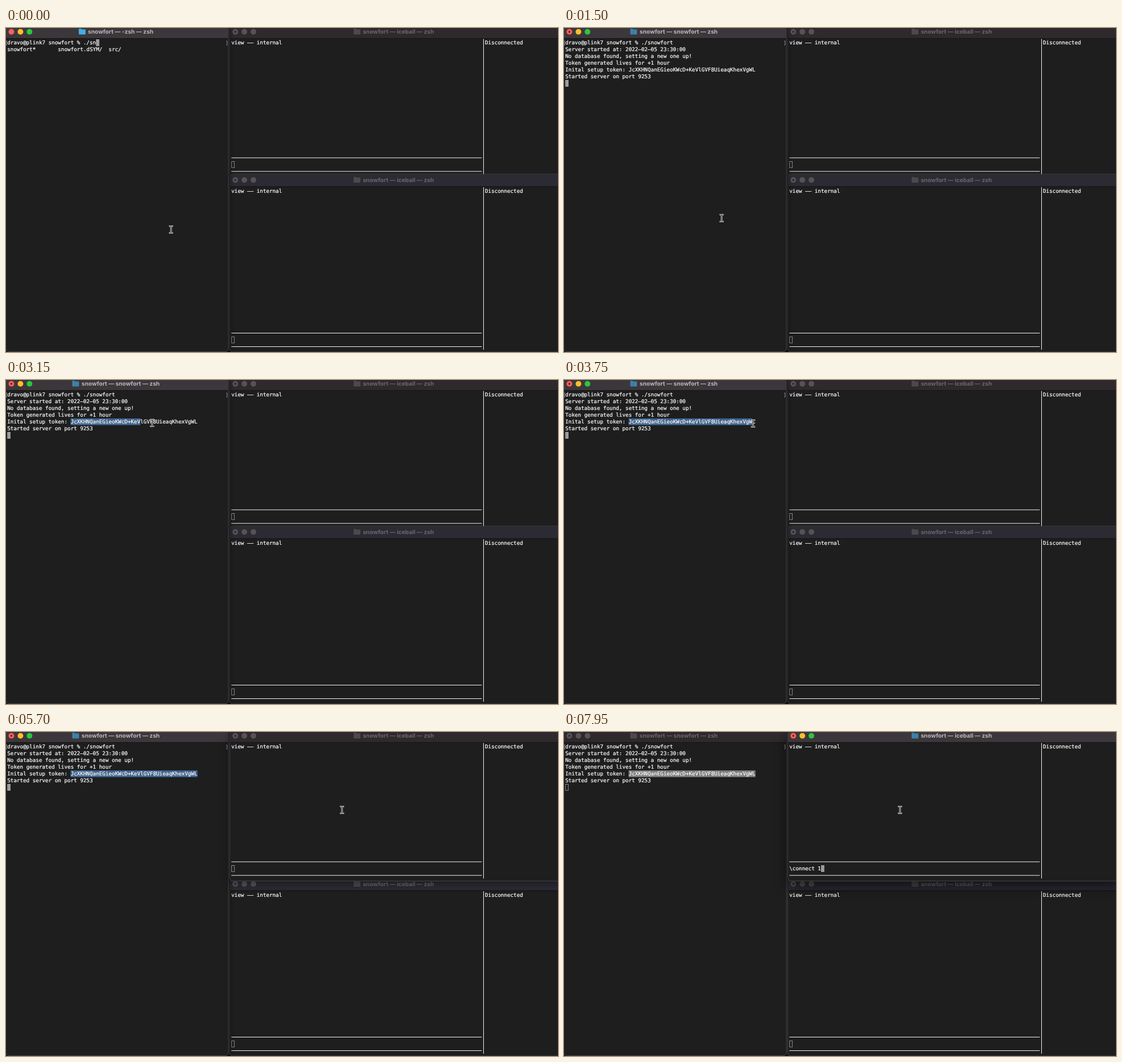
Recreate the animation shown at these times as an HTML page. Size 975 by 574 pixels, loop 8000 ms.

```html
<!DOCTYPE html>
<html lang="en">
<head>
<meta charset="utf-8">
<title>Terminal session</title>
<style>
  html, body { margin: 0; width: 100%; height: 100%; overflow: hidden; background: #121113; }
  svg { display: block; width: 975px; height: 574px; }
  text { white-space: pre; text-rendering: geometricPrecision; }
  .mono { font: 9.3px "DejaVu Sans Mono", monospace; fill: #fff; stroke: #fff; stroke-width: .22px; }
  .title { font: 700 10.2px Inter, sans-serif; text-anchor: middle; fill: #6c676b; }
  .frame { fill: #1e1e1e; stroke: #57555a; stroke-width: .8px; }
  .bar { fill: #2f292d; }
  #bottom .bar { fill: #2c2a33; }
  .edge { fill: #151315; }
  .folder { fill: #4d484b; }
  .light { fill: #575255; }
  .dot { fill: #2a2528; }
  .cell { fill: none; stroke: #8c8c8c; stroke-width: 1px; }
  .rule { fill: #f4f4f4; }
  .mark { fill: none; stroke: #8c8c8c; }
  .selection { fill: #7b7b7b; }
  .on .title { fill: #bcb8bb; }
  .on .bar { fill: #3c373a; }
  .on .folder { fill: #3c80a8; }
  .on.idle .folder { fill: #41aeea; }
  .on .light0 { fill: #ff5f57; }
  .on .light1 { fill: #febc2e; }
  .on .light2 { fill: #28c840; }
  .on .dot { fill: #7c1511; }
  .idle .dot { display: none; }
  .on .cell { fill: #9c9c9c; stroke: #9c9c9c; }
  .on .selection { fill: #3f638c; }
  #left.on .frame { filter: drop-shadow(2px 2px 4px rgba(0, 0, 0, .4)); }
  #top.raised .frame { filter: drop-shadow(0 4px 8px rgba(0, 0, 0, .4)); }
  #top.on .frame { filter: drop-shadow(0 9px 11px rgba(0, 0, 0, .6)); }
  #mouse path { fill: none; stroke: #f2f2f2; stroke-width: 2.6px; stroke-linecap: round; }
  #mouse .core { stroke: #161616; stroke-width: 1px; }
</style>
</head>
<body>
<svg id="stage" viewBox="0 0 975 574"></svg>
<script>
const LOOP = 8000, TICK = 150;
const COL = 5.6, ROW = 12, TOP = 19.5;
const PROMPT = 'dravo@plink7 snowfort % ./sn';
const COMMAND = PROMPT + 'owfort';
const LISTING = 'snowfort*'.padEnd(16) + 'snowfort.dSYM/'.padEnd(16) + 'src/';
const TOKEN = 'JcXKHNQanEGieoKWcD+KeVlGVF8UieaqKhexVgWL';
const LOG = [
  COMMAND,
  'Server started at: 2022–02–05 23:30:00',
  'No database found, setting a new one up!',
  'Token generated lives for +1 hour',
  'Inital setup token: ' + TOKEN,
  'Started server on port 9253',
];
const INPUT = '\\connect 1';
const LEFT_X = 2.2, RIGHT_X = 398, TOKEN_X = LEFT_X + 20 * COL;

const $ = id => document.getElementById(id);
const rowY = row => TOP + row * ROW;
const cellY = row => Math.round(rowY(row));
const mono = (x, row, text = '', id = '') =>
  `<text class="mono" ${id && `id="${id}"`} x="${x}" y="${rowY(row) + 9.7}">${text}</text>`;
const box = (cls, x, y, w, h) =>
  `<rect class="${cls}" x="${x}" y="${y}" width="${w}" height="${h}"/>`;
const cell = (id, x, row) =>
  `<rect class="cell" id="${id}" x="${x + .5}" y="${cellY(row) + .5}" width="${COL - .8}" height="${ROW - 1}"/>`;

// A window whose title bar starts just above y = 0
function chrome(id, x, w, h, titleX, title, folderX, content, y = 0) {
  const lights = [0, 1, 2].map(i =>
    `<circle class="light light${i}" cx="${x + 10 + 16 * i}" cy="6.7" r="5"/>`).join('');
  return `<g id="${id}" transform="translate(0 ${y})">
    <rect class="frame" x="${x}" y="-3.5" width="${w}" height="${h}" rx="6"/>
    <path class="bar" d="M${x + .4} 18V2.5q0-5.6 5.6-5.6H${x + w - 6}q5.6 0 5.6 5.6V18z"/>
    ${box('edge', x + .4, 18, w - .8, 1)}
    ${lights}<circle class="dot" cx="${x + 10}" cy="6.7" r="1.7"/>
    <path class="folder" transform="translate(${folderX} 1.2)"
      d="M0 1.2Q0 0 1.2 0H4l1.3 1.3h5.5q1.2 0 1.2 1.2V9q0 1.2-1.2 1.2H1.2Q0 10.2 0 9z"/>
    <text class="title" x="${titleX}" y="10">${title}</text>
    ${content}</g>`;
}

function client(id, rows, h, y) {
  const rule = row => box('rule', RIGHT_X, rowY(row) + 6, 79 * COL, 1);
  return chrome(id, 395, 590, h, 693, 'snowfort — iceball — zsh', 614,
    mono(RIGHT_X, 0, 'view –– internal') +
    mono(RIGHT_X + 80 * COL, 0, 'Disconnected') +
    box('rule', Math.floor(RIGHT_X + 79.5 * COL), TOP, 1, rows * ROW) +
    rule(rows - 3) + rule(rows - 1) +
    cell(id + 'Cell', RIGHT_X, rows - 2) +
    mono(RIGHT_X, rows - 2, '', id + 'Input'), y);
}

const server = chrome('left', -.5, 393.5, 577, 202.5, '', 0,
  `<path class="mark" d="M2 23H.5v7H2M389 23h1.5v7H389"/>` +
  `<rect class="selection" id="selection" x="${TOKEN_X}" y="${cellY(4)}" width="0" height="${ROW}"/>` +
  cell('leftCell', LEFT_X, 0) +
  LOG.map((_, i) => mono(LEFT_X, i, '', 'line' + i)).join(''));

const beam = 'M-2.5-6Q0-6 0-4.5Q0-6 2.5-6M0-4.5V4.5M-2.5 6Q0 6 0 4.5Q0 6 2.5 6';
$('stage').innerHTML =
  client('top', 20, 267.5, 0) + client('bottom', 24, 315, 262.5) + server +
  `<g id="mouse"><path d="${beam}"/><path class="core" d="${beam}"/></g>`;

const linear = p => p;
const smooth = p => p * p * (3 - 2 * p);
const slowDown = p => 1 - (1 - p) ** 2;

// [time, x, y, easing towards this point]
const PATH = [
  [1350, 291.5, 357],
  [2250, 114.5, 83, smooth],
  [2400, 115, 74.5, linear],
  [2550, 115, 72.5, linear],
  [2700, 115, 72.5, linear],
  [2850, 140, 73, linear],
  [3150, 258, 76, linear],
  [3750, 334, 77, slowDown],
  [4500, 339, 80, linear],
  [5100, 339, 80, linear],
  [5700, 593.5, 138, smooth],
];

function mouseAt(t) {
  const i = PATH.findIndex(key => key[0] > t);
  if (i === 0) return PATH[0].slice(1, 3);
  if (i < 0) return PATH[PATH.length - 1].slice(1, 3);
  const [t0, x0, y0] = PATH[i - 1], [t1, x1, y1, ease] = PATH[i];
  const p = ease((t - t0) / (t1 - t0));
  return [x0 + (x1 - x0) * p, y0 + (y1 - y0) * p];
}

// The highlight trails the pointer a little
function selectedChars(t) {
  if (t < 2850) return 0;
  const x = mouseAt(Math.min(t, 4550) - 50)[0];
  return Math.min(TOKEN.length, Math.floor((x - TOKEN_X) / COL));
}

function typedChars(t) {
  if (t < 6600) return 0;
  if (t < 7050) return 1;
  return 1 + Math.round(9 * ((t - 7050) / TICK + 1) / 7);
}

function logAt(t) {
  if (t < 150) return [PROMPT, LISTING];
  return t < 600 ? [COMMAND] : LOG;
}

function setCell(id, x, row) {
  $(id).setAttribute('x', x + .5);
  $(id).setAttribute('y', cellY(row) + .5);
}

function draw(t) {
  const running = t >= 750, raised = t >= 5700, swapped = t >= 5850;
  const left = $('left'), top = $('top');

  left.classList.toggle('on', !swapped);
  left.classList.toggle('idle', !running);
  top.classList.toggle('on', swapped);
  top.classList.toggle('raised', raised);
  const order = raised ? ['bottom', 'left', 'top'] : ['top', 'bottom', 'left'];
  $('stage').append(...order.map($), $('mouse'));

  left.querySelector('.title').textContent = `snowfort — ${running ? 'snowfort' : '-zsh'} — zsh`;
  left.querySelector('.folder').setAttribute('transform', `translate(${running ? 117 : 128.5} 1.2)`);

  const lines = logAt(t);
  LOG.forEach((_, i) => $('line' + i).textContent = lines[i] || '');
  if (t < 600) setCell('leftCell', LEFT_X + lines[0].length * COL, 0);
  else setCell('leftCell', LEFT_X, LOG.length);
  $('selection').setAttribute('width', selectedChars(t) * COL);

  const typed = typedChars(t);
  $('topInput').textContent = INPUT.slice(0, typed);
  setCell('topCell', RIGHT_X + typed * COL, 18);

  $('mouse').setAttribute('transform', `translate(${mouseAt(t)})`);
}

const start = performance.now();
let shown = -1;
function tick() {
  const t = Math.floor((performance.now() - start) % LOOP / TICK) * TICK;
  if (t !== shown) draw(shown = t);
  requestAnimationFrame(tick);
}
tick();
</script>
</body>
</html>
```
